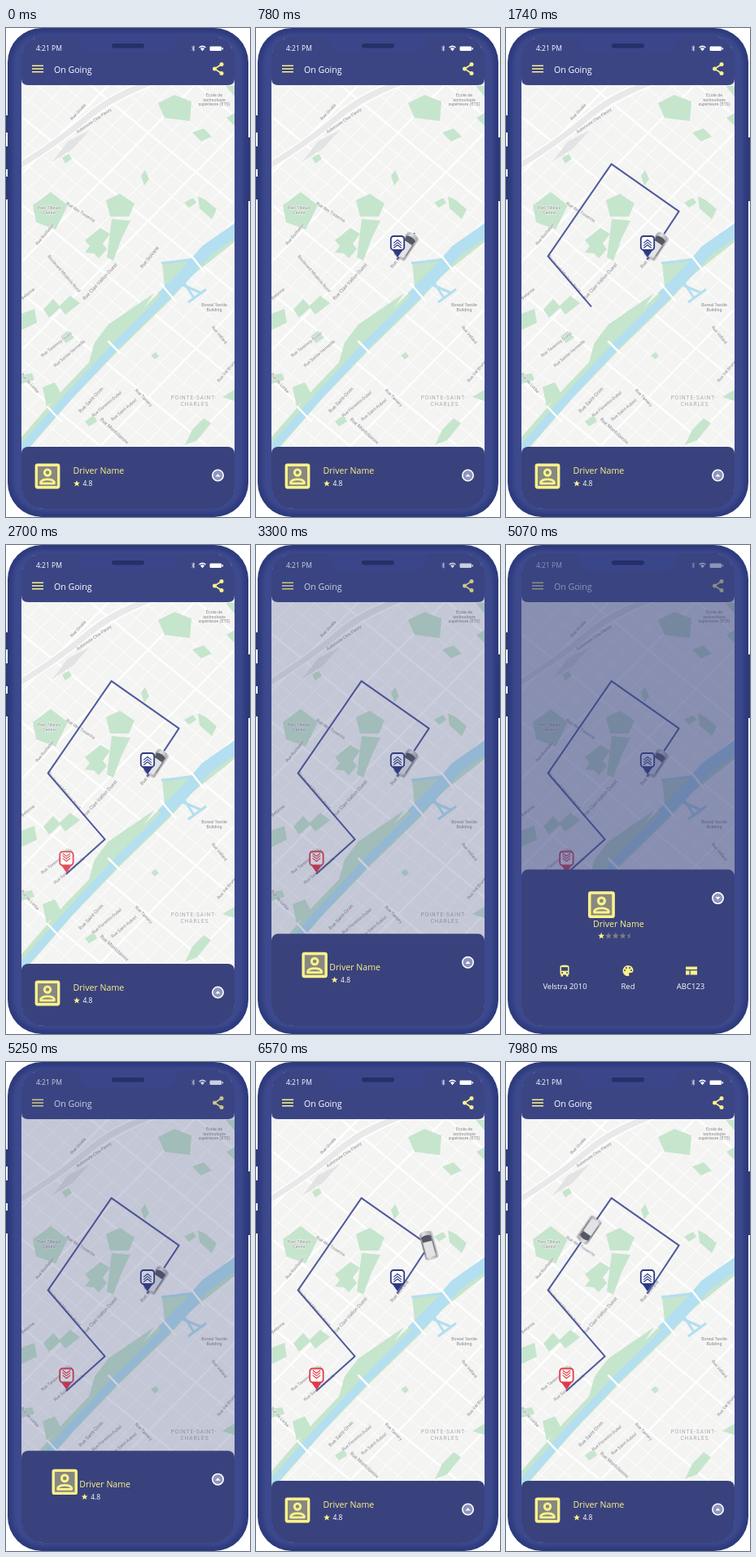
Animation of 300x599 px, one loop 8000 ms. Source, as an HTML page:

```html
<!DOCTYPE html>
<html lang="en">
<head>
<meta charset="utf-8">
<title>Ride tracking</title>
<style>
  html, body { margin: 0; height: 100%; overflow: hidden; background: #fff; }
  svg { display: block; width: 100%; height: 100%; font-family: "Open Sans", sans-serif; }
  .yellow { fill: #fdf28a; }
  .white { fill: #fff; }
  .line { fill: none; stroke-linecap: round; stroke-linejoin: round; }
  .park { fill: #c6e5cd; }
  .water { fill: none; stroke: #b3dff0; stroke-linejoin: round; }
  .mid { text-anchor: middle; }
  #labels { fill: #858589; font-family: Roboto, sans-serif; text-anchor: middle; stroke: #f8f8f8; stroke-width: 1; paint-order: stroke; }
</style>
</head>
<body>
<svg viewBox="0 0 300 599">
  <defs>
    <linearGradient id="silver">
      <stop offset="0" stop-color="#9fa0a6"/><stop offset=".35" stop-color="#e2e2e4"/><stop offset="1" stop-color="#a3a3aa"/>
    </linearGradient>
    <filter id="soft"><feGaussianBlur stdDeviation="2.5"/></filter>
    <clipPath id="screen"><rect x="19" y="10" width="262" height="579" rx="28"/></clipPath>
    <clipPath id="detailArea"><rect x="19" y="300" width="262" height="248"/></clipPath>
    <path id="star" d="M0-4 1.1-1.3 4-1.2 1.7.6 2.5 3.4 0 1.8-2.5 3.4-1.7.6-4-1.2-1.1-1.3Z"/>
    <g id="pinShape">
      <path d="M-7-10 0 0 7-10Z" fill="currentColor"/>
      <rect x="-8.2" y="-26" width="16.4" height="16.8" rx="3.4" fill="#fff" stroke="currentColor" stroke-width="1.8"/>
    </g>
    <path id="chevrons" class="line" d="M-4.5-17.8 0-21.5 4.5-17.8M-4.5-14.6 0-18.3 4.5-14.6M-4.5-11.8 0-15.3 4.5-11.8" stroke="currentColor" stroke-width="1.1"/>
  </defs>

  <!-- Phone body -->
  <path d="M0 107h4v21H0ZM0 145h4v28H0ZM0 182h4v28H0ZM296 134h4v78h-4Z" fill="#2c3874"/>
  <rect x="2" y="0" width="296" height="599" rx="42" fill="#2d3b7d"/>
  <rect x="8" y="6" width="284" height="587" rx="37" fill="#3c4a8d" filter="url(#soft)"/>

  <g clip-path="url(#screen)">
    <rect x="19" y="60" width="262" height="470" fill="#f4f4f3"/>
    <g id="roads" class="line" stroke="#fff"></g>
    <path class="line" d="M10 173Q62 141 96 112T176 68" stroke="#e8e9e9" stroke-width="8"/>
    <path class="line" d="M10 168Q62 136 96 107T170 66M10 178Q62 146 100 116T184 69" stroke="#fff" stroke-width="1.5"/>
    <path d="M57 164 76 139 103 125 82 148Z" fill="#e2e3e3"/>
    <g class="park">
      <path d="M33 217 55 201 76 217 61 247 37 238Z"/>
      <path d="M123 211 140 203 158 215 151 231H128ZM130 234 153 236 142 258 132 285 124 281Z"/>
      <path d="M166 181 171 174 176 185 170 193ZM69 159 77 154 81 160 73 166Z"/>
      <path d="M97 260 116 245 128 252 119 264 124 271 114 282 108 276 97 275 103 267Z"/>
      <path d="M219 214 230 208 234 214 225 220ZM236 206 246 211 259 222 253 234 238 221Z"/>
      <path d="M187 92 207 82 228 90 226 114 195 110ZM229 128 243 123 253 133 240 139ZM270 71 281 71 281 84Z"/>
      <path d="M46 345 58 332 67 342 53 355ZM65 341 79 328 91 337 73 351ZM19 350 35 344 38 361 19 370Z"/>
      <path d="M67 378 76 371 84 379 74 386ZM178 401 184 397 188 402 183 406ZM271 110 281 104 281 120Z"/>
      <path d="M45 440 60 434 68 448 50 464ZM19 425 32 423 35 431 19 436Z"/>
      <path d="M192 287 235 281 220 301 195 318ZM126 363 182 325 150 371 98 424 109 385Z"/>
      <path d="M220 511 229 492 243 478 252 484 235 505ZM266 452 281 443 281 457ZM97 482 108 474 112 482 102 488Z"/>
    </g>
    <path class="line" d="M14 519 77 447 136 386 196 328 225 296 286 248" stroke="#c6e5cd" stroke-width="16"/>
    <path class="water" d="M14 522 79 449 137 387 198 328" stroke-width="9.5"/>
    <path class="water" d="M192 330 225 297 246 273 290 242" stroke-width="15"/>
    <path class="water" d="M191 288 229 284M213 313 241 325M224 336 246 320M215 306 232 332" stroke-width="3"/>
    <path class="line" d="M190 313 208 334M228 279 243 298M51 464 68 482M126 384 140 398" stroke="#fff" stroke-width="2.5"/>
    <g id="labels"></g>

    <path id="route" class="line" d="M174 283 212.6 224.6 129.6 166.6 51.6 279.6 121.6 360.6 74.6 402.6" stroke="#515a9b" stroke-width="2"/>
    <g id="car">
      <rect x="-8" y="-16.5" width="17" height="35" rx="4" fill="#555" opacity=".25"/>
      <path d="M-7.500 17V-11Q-7-17 0-17T7.500-11V17Z" fill="url(#silver)"/>
      <path d="M-6.500-10Q0-14 6.500-10L5.500-4H-5.500Z" fill="#555762"/>
      <path d="M-6.600-6V11M6.600-6V11" stroke="#7c7d86" stroke-width="1.100"/>
      <rect x="-5.300" y="-3.500" width="10.600" height="18.500" rx="1" fill="#e3e3e5"/>
    </g>
    <g id="startPin" color="#2e3b82"><use href="#pinShape"/><use href="#chevrons"/></g>
    <g id="endPin" color="#e23a46"><use href="#pinShape"/><use href="#chevrons" transform="translate(0 -35.5) scale(1 -1)"/></g>

    <!-- Header -->
    <path d="M19 0H281V62Q281 70 273 70H27Q19 70 19 62Z" fill="#3b4584"/>
    <g class="white">
      <text x="37" y="28" font-size="8.5">4:21 PM</text>
      <text x="59" y="54.5" font-size="10.6" font-weight="500">On Going</text>
      <rect x="250.5" y="22.5" width="14.5" height="5.6" rx="1.3"/>
      <rect x="265.6" y="24" width="1.4" height="2.6"/>
      <path d="M237 23.4Q241.5 19.8 246 23.4L244.9 24.6Q241.5 22 238.1 24.6ZM238.9 25.3Q241.5 23.4 244.1 25.3L241.5 28.3Z"/>
    </g>
    <path class="line" d="M228.6 23.2 232 26.6 230.3 28.2V21.8L232 23.4 228.6 26.8" stroke="#fff" stroke-width=".7"/>
    <path d="M32 46.2H46M32 50H46M32 53.8H46" stroke="#fdf28a" stroke-width="1.6"/>
    <path class="line" d="M265 44.5 256.5 50 265 55.5" stroke="#fdf28a" stroke-width="1.5"/>
    <g class="yellow"><circle cx="265" cy="44.5" r="2.5"/><circle cx="256.5" cy="50" r="2.5"/><circle cx="265" cy="55.5" r="2.5"/></g>
    <rect id="shade" x="19" y="0" width="262" height="599" fill="#39437f"/>

    <!-- Driver sheet -->
    <g id="sheet">
      <rect x="19" y="513" width="262" height="270" rx="8" fill="#39427c"/>
      <circle cx="260.5" cy="548" r="6.7" fill="#8f95bd" stroke="#fff" stroke-width="1.6"/>
      <path id="caret" d="M-3 1.6 0-1.8 3 1.6Z" class="white"/>
    </g>
    <g clip-path="url(#detailArea)"><g id="details">
      <g class="yellow">
        <path d="M66.500 460Q66.500 458 72 458T77.500 460V469.500H76.500V472H74V470H70V472H67.500V469.500H66.500Z"/>
        <path d="M150 458.500A6.500 6.500 0 1 0 150 471.500Q152 471.500 151.200 469.500 150.500 467.500 152.800 467.500 156.800 467.500 156.500 464 155.800 458.800 150 458.500Z"/>
        <path d="M221 460h14v3.500H221ZM221 464.700h4.500V470H221ZM226.700 464.700H235V470H226.700Z"/>
      </g>
      <g fill="#39427c">
        <path d="M68 460.500h8v4.500h-8Z"/><circle cx="69" cy="467.500" r="1"/><circle cx="75" cy="467.500" r="1"/>
        <circle cx="146" cy="464.500" r="1"/><circle cx="148" cy="461.500" r="1"/><circle cx="152" cy="461.500" r="1"/><circle cx="154" cy="464.500" r="1"/>
      </g>
      <g class="white mid" font-size="9.5">
        <text x="72.500" y="487.500">Velstra 2010</text><text x="150" y="487.500">Red</text><text x="227" y="487.500">ABC123</text>
      </g>
      <rect x="42" y="513.500" width="99" height="50" rx="8" fill="#424d98"/>
      <rect x="158.500" y="513.500" width="99.500" height="50" rx="8" class="yellow"/>
      <g font-size="12.800" font-weight="700">
        <text x="67" y="536.500" class="white">CANCEL</text><text x="180" y="536.500" fill="#39427c">CALL</text>
      </g>
      <path d="M221.500 525h3l1 3.500-2 1.800q1.800 3.500 5 5.200l2-2 3.500 1v3.200q-11.500 0-12.500-12.700Z" class="line" stroke="#39427c" stroke-width="1.500"/>
    </g></g>
    <g id="avatar">
      <rect x="-14" y="-14" width="28" height="28" class="yellow" opacity=".4"/>
      <g class="line" stroke="#fdf28a" stroke-width="3.4">
        <rect x="-14" y="-14" width="28" height="28" rx="1.5"/>
        <circle cy="-4.5" r="3.8" stroke-width="3"/>
        <path d="M-8.5 9V7.5Q-7 4 0 4T8.500 7.500V9Z" stroke-width="2.800"/>
      </g>
    </g>
    <text id="driver" font-size="10.6" font-weight="500" class="yellow">Driver Name</text>
    <g id="rating" class="yellow">
      <use href="#star"/>
      <text id="score" x="7.500" y="3.300" font-size="8.500" font-weight="500" class="white">4.8</text>
      <g id="moreStars"></g>
    </g>
  </g>

  <path d="M84 10H216Q211 11 209 19 205 31 196 31H104Q95 31 91 19 89 11 84 10Z" fill="#3a478b" opacity=".8"/>
  <rect x="130" y="19" width="40" height="5.500" rx="2.700" fill="#252f68"/>
</svg>

<script>
const LOOP = 8000;
const el = id => document.getElementById(id);
const place = (id, x, y, extra = '') => el(id).setAttribute('transform', `translate(${x} ${y}) ${extra}`);
const fade = (id, value) => el(id).setAttribute('opacity', value);
const lerp = (a, b, p) => a + (b - a) * p;
const clamp = u => Math.min(1, Math.max(0, u));
const span = (t, start, length) => clamp((t - start) / length);
const easeOut = u => 1 - (1 - u) ** 3;
const easeInOut = u => u < .5 ? 2 * u * u : 1 - 2 * (1 - u) ** 2;

// Street grid: two families of nearly parallel roads.
let roads = '';
for (let i = -4; i < 30; i++) {
  const width = i % 4 ? 1 : 2.4;
  const y = 80 + i * 27;
  roads += `<path d="M10 ${y}L290 ${y - 285}" stroke-width="${width}"/>`;
  roads += `<path d="M10 ${y - 195}L290 ${y + 35}" stroke-width="${width}"/>`;
}
el('roads').innerHTML = roads;

const labels = [
  ['Rue Orvale', 90, 104, -47], ['Autoroute Clos-Fleury', 109, 115, -34],
  ['École de', 256, 84, 0], ['technologie', 256, 89.5, 0], ['supérieure (ÉTS)', 256, 95, 0],
  ['Parc Tilleuls', 53, 222, 0], ['Centre', 53, 228, 0],
  ['Rue Rochebel', 49, 254, -50], ['Rue des Tisserins', 91, 227, 33],
  ['Boulevard Mirabois-Nord', 70, 302, 49], ['Rue Clair-Vallon Ouest', 117, 312, -47, 6],
  ['Rue Solvane', 178, 282, -51, 6], ['Rue Belorme', 24, 330, -38],
  ['Boreal Textile', 256, 341, 0], ['Building', 256, 347, 0],
  ['Rue Tavernoy Ouest', 63, 389, -38], ['Rue Sainte-Vermeille', 79, 400, -40],
  ['Rue de Lorbe', 28, 436, 48], ['Rue Saint-Orvin', 106, 457, -46, 6],
  ['Rue Florentin-Dubel', 125, 462, -40], ['Rue Tamery', 168, 454, 46],
  ['Rue Saint-Aubrel', 146, 469, -40], ['Rue Montclairoix', 132, 495, 42, 6],
  ['Rue Vellard', 261, 377, 50], ['Rue Val Brunet', 273, 421, -50]
];
el('labels').innerHTML = labels.map(([text, x, y, angle, size = 5.3]) =>
  `<text transform="translate(${x} ${y}) rotate(${angle})" font-size="${size}">${text}</text>`).join('') +
  '<g fill="#a6a6aa" font-size="6.5" letter-spacing="1"><text x="231" y="455">POINTE-SAINT-</text><text x="232" y="463">CHARLES</text></g>';

el('moreStars').innerHTML = [1, 2, 3].map(i => `<use href="#star" x="${i * 8.8}"/>`).join('') +
  '<path transform="translate(35.2 0)" d="M0-4V1.800L-2.500 3.400-1.700.6-4-1.200-1.100-1.300Z"/>';

const route = el('route');
const routeLength = route.getTotalLength();

function drawCar(t) {
  // Accelerates from rest, then cruises; the heading follows a chord of the route.
  const speed = .1057, rampTime = 475;
  const elapsed = Math.max(0, t - 5850);
  const ramp = Math.min(elapsed, rampTime);
  const s = 20 + speed * (ramp * ramp / (2 * rampTime) + elapsed - ramp);
  const here = route.getPointAtLength(s);
  const back = route.getPointAtLength(s - 14);
  const ahead = route.getPointAtLength(s + 14);
  const heading = Math.atan2(ahead.x - back.x, back.y - ahead.y) * 180 / Math.PI;
  place('car', here.x, here.y, `rotate(${heading})`);
  fade('car', span(t, 300, 300));
}

function drawPin(id, x, y, u) {
  place(id, x, y, `scale(${easeOut(u)})`);
  fade(id, u);
}

function drawSheet(p) {
  fade('shade', .75 * p ** .7);
  place('sheet', 0, -172 * p);
  place('caret', 260.5, 548, `rotate(${p < .5 ? 0 : 180})`);
  place('details', 0, 172 * (1 - p));
  place('avatar', lerp(51, 150, p), lerp(549, 387.5, p), `scale(${lerp(.98, 1.08, p)})`);
  place('driver', lerp(82.5, 119, p), lerp(546, 430, p));
  place('rating', lerp(87, 132, p), lerp(558, 440, p));
  fade('score', clamp(1.4 - 2 * p));
  fade('moreStars', clamp(2 * p - 1));
}

function draw(t) {
  const drawn = easeInOut(span(t, 400, 1930)) * routeLength;
  route.setAttribute('stroke-dasharray', `${drawn} ${routeLength + 9}`);
  fade('route', drawn > 0 ? 1 : 0);
  drawCar(t);
  drawPin('startPin', 174, 281, span(t, 300, 300));
  drawPin('endPin', 74.4, 401.5, span(t, 2330, 420));
  drawSheet(t < 4990 ? easeOut(span(t, 3251, 650)) : 1 - easeOut(span(t, 4990, 650)));
}

const begin = performance.now();
function tick() {
  draw((performance.now() - begin) % LOOP);
  requestAnimationFrame(tick);
}
tick();
</script>
</body>
</html>
```
